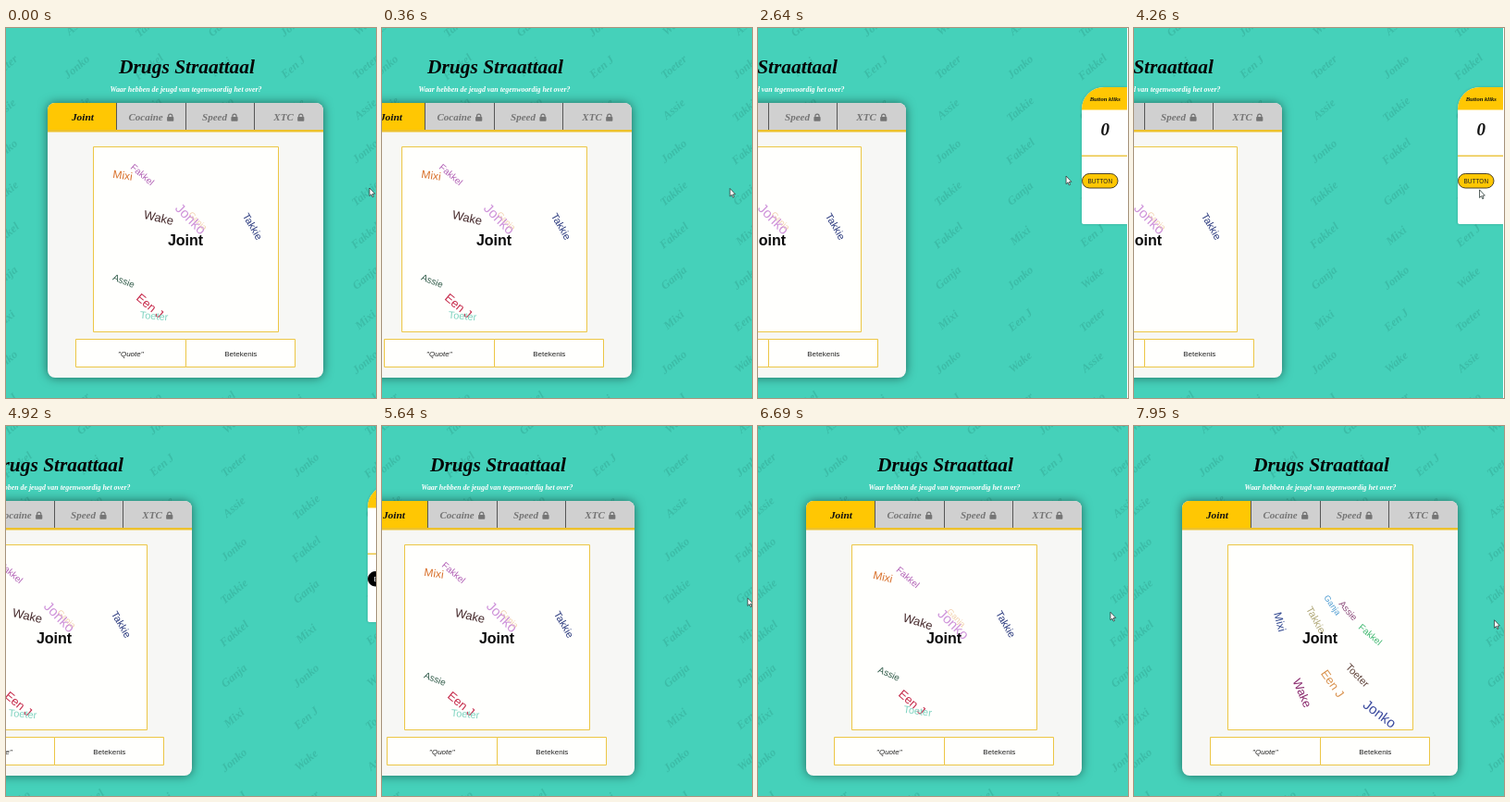
Recreate the animation shown at these times as an HTML page with a canvas. Size 400 by 400 pixels, loop 8 s.

```html
<!DOCTYPE html>
<html lang="nl">
<head>
<meta charset="utf-8">
<title>Drugs Straattaal</title>
<style>
  html, body { margin: 0; width: 100%; height: 100%; overflow: hidden; background: #45d1ba; }
  canvas { display: block; width: 400px; height: 400px; }
</style>
</head>
<body>
<canvas id="stage"></canvas>
<script>
const LOOP = 8000;
const SANS = '"Liberation Sans", Arial, sans-serif';
const SCRIPT = '"Liberation Serif", serif';
const TEAL = '#45d1ba', YELLOW = '#ffc703', LINE = '#ecc645', PAPER = '#fffffd', GRAY = '#757575';
const CARD = { x: 45, y: 81, w: 298, h: 297 };
const SIDE = { x: 533, y: 64, w: 49, h: 148 };

const canvas = document.getElementById('stage');
const ratio = window.devicePixelRatio || 1;
canvas.width = canvas.height = 400 * ratio;
const ctx = canvas.getContext('2d');

const slang = ['Toeter', 'Assie', 'Jonko', 'Takkie', 'Fakkel', 'Ganja', 'Mixi', 'Jonko', 'Een J', 'Wake'];

// Each word moves from one spot to another when the cloud is shuffled
const cloud = [
  { word: 'Mixi',   size: 12, tilt: 8,  from: [126, 160], to: [150, 212], inks: ['#d9722e', '#30478f'] },
  { word: 'Fakkel', size: 10, tilt: 41, from: [147, 159], to: [248, 226], inks: ['#b262b6', '#42b972'] },
  { word: 'Wake',   size: 13, tilt: 13, from: [165, 206], to: [174, 289], inks: ['#462a2c', '#8a2a6e'] },
  { word: 'Ganja',  size: 9,  tilt: 45, from: [207, 209], to: [207, 194], inks: ['#f1cfaa', '#4a9ad0'] },
  { word: 'Jonko',  size: 15, tilt: 45, from: [199, 207], to: [258, 312], inks: ['#cf94da', '#3b4a9e'] },
  { word: 'Takkie', size: 11, tilt: 60, from: [266, 215], to: [189, 210], inks: ['#2b3a7e', '#b0a878'] },
  { word: 'Assie',  size: 10, tilt: 22, from: [127, 274], to: [224, 200], inks: ['#2f5a48', '#8a4a7a'] },
  { word: 'Een J',  size: 13, tilt: 40, from: [155, 301], to: [207, 279], inks: ['#c62b4b', '#d9924e'] },
  { word: 'Toeter', size: 11, tilt: 5,  from: [160, 312], to: [234, 270], inks: ['#7fd3c0', '#5d4037'] }
];

const pointerKeys = [
  [0, 393, 173], [750, 358, 174], [2640, 333, 160], [3180, 368, 199], [3900, 362, 198],
  [4400, 378, 166], [4750, 412, 168], [6400, 381, 201], [7650, 381, 202], [LOOP, 391, 211]
];

const mix = (a, b, k) => a + (b - a) * k;
const span = (t, a, b) => Math.max(0, Math.min(1, (t - a) / (b - a)));
const smooth = k => k * k * (3 - 2 * k);
const pan = t => -183 * span(t, 0, 900) + 190 * span(t, 4510, 6420);

function pointerAt(t) {
  const i = Math.max(1, pointerKeys.findIndex(k => k[0] >= t));
  const [t0, x0, y0] = pointerKeys[i - 1], [t1, x1, y1] = pointerKeys[i];
  const k = span(t, t0, t1);
  return [mix(x0, x1, k), mix(y0, y1, k)];
}

function box(x, y, w, h, r, fill, stroke) {
  ctx.beginPath();
  ctx.roundRect(x, y, w, h, r);
  if (fill) { ctx.fillStyle = fill; ctx.fill(); }
  if (stroke) { ctx.strokeStyle = stroke; ctx.stroke(); }
}

function shaded(blur, alpha, paint) {
  ctx.save();
  ctx.shadowColor = `rgba(0,0,0,${alpha})`;
  ctx.shadowBlur = blur * ratio;
  paint();
  ctx.restore();
}

function label(text, x, y, font, color) {
  ctx.font = font;
  ctx.fillStyle = color;
  ctx.fillText(text, x, y);
}

const script = (text, x, y, size, color) => label(text, x, y, `italic bold ${size}px ${SCRIPT}`, color);

function turned(text, x, y, deg, font, color) {
  ctx.save();
  ctx.translate(x, y);
  ctx.rotate(deg * Math.PI / 180);
  ctx.textBaseline = 'middle';
  label(text, 0, 0, font, color);
  ctx.restore();
}

function pattern() {
  const n = slang.length;
  for (let c = 0; c < 8; c++) {
    for (let r = 0; r < n; r++) {
      const word = slang[(r + 2 * c + n - 1) % n];
      turned(word, c * 78 - 1, r * 45.6 - 3, -40, `italic bold 12.5px ${SCRIPT}`, '#3cbca7');
    }
  }
}

function lock(x) {
  box(x - 3.6, 96, 7.2, 4.8, .8, GRAY);
  ctx.beginPath();
  ctx.arc(x, 95.2, 2.1, Math.PI, 0);
  ctx.lineTo(x + 2.1, 96.5);
  ctx.moveTo(x - 2.1, 95.2);
  ctx.lineTo(x - 2.1, 96.5);
  ctx.lineWidth = 1.2;
  ctx.strokeStyle = GRAY;
  ctx.stroke();
  ctx.lineWidth = 1;
}

function tabs() {
  const w = CARD.w / 4;
  box(CARD.x, CARD.y, CARD.w, 30, [8, 8, 0, 0], '#d0d0d0');
  box(CARD.x, CARD.y, w, 30, [8, 0, 0, 0], YELLOW);
  ['Joint', 'Cocaine', 'Speed', 'XTC'].forEach((name, i) => {
    const left = CARD.x + i * w, mid = left + w / 2;
    if (!i) return script(name, mid + .7, 100, 11.4, '#111');
    box(Math.floor(left), CARD.y, 1, 29, 0, '#565656');
    script(name, mid - 5.7, 100, 11, GRAY);
    lock(mid + 2.3 + ctx.measureText(name).width / 2);
  });
  box(CARD.x, 110, CARD.w, 2.5, 0, '#edc12d');
}

function drawCloud(t) {
  const k = smooth(span(t, 6600, 7140));
  box(94.5, 128.5, 200, 200, 0, PAPER, LINE);
  for (const { word, size, tilt, from, to, inks } of cloud) {
    const endTilt = 75 - .35 * (to[0] - 150);
    turned(word, mix(from[0], to[0], k), mix(from[1], to[1], k), mix(tilt, endTilt, k),
      `${size}px ${SANS}`, inks[k < .5 ? 0 : 1]);
  }
  label('Joint', 194, 234.5, `bold 16px ${SANS}`, '#0b0b0b');
}

function card(t) {
  shaded(11, .5, () => box(CARD.x, CARD.y, CARD.w, CARD.h, 8, '#f7f7f5'));
  tabs();
  drawCloud(t);
  ['"Quote"', 'Betekenis'].forEach((text, i) => {
    const x = 75.5 + i * 119;
    box(x, 336.5, 119 - i, 30, 0, PAPER, LINE);
    label(text, x + 59.3, 354.5, `${i ? '' : 'italic '}8px ${SANS}`, '#222');
  });
}

function counter(t) {
  const { x, y, w, h } = SIDE, mid = x + w / 2 + .8;
  const [fill, edge, ink] = t > 4320 ? ['#000', '#000', '#fff'] : [YELLOW, '#4a4024', '#222'];
  shaded(3, .2, () => box(x, y, w, h, [24, 0, 0, 2], '#fff'));
  box(x, y, w, 24.5, [24, 0, 0, 0], YELLOW);
  script('Button kliks', mid, 78.5, 6.6, '#111');
  script('0', mid, 116, 19, '#111');
  box(x, 137.6, w, 1.3, 0, LINE);
  box(x + .5, 157.5, 38.5, 15.5, 7.8, fill, edge);
  label('BUTTON', x + 19.8, 167.7, `6.5px ${SANS}`, ink);
}

function pointer(x, y) {
  ctx.save();
  ctx.translate(x, y);
  ctx.fill(new Path2D('M0 0V8.6L1.9 6.8 3.2 9.8 4.5 9.2 3.2 6.4 5.8 6.2Z'));
  ctx.fillStyle = '#fff';
  const arrow = new Path2D('M0 0V8.6L1.9 6.8 3.2 9.8 4.5 9.2 3.2 6.4 5.8 6.2Z');
  ctx.fill(arrow);
  ctx.lineWidth = .7;
  ctx.strokeStyle = '#222';
  ctx.stroke(arrow);
  ctx.restore();
}

function draw(t) {
  ctx.setTransform(ratio, 0, 0, ratio, 0, 0);
  ctx.textAlign = 'center';
  ctx.lineWidth = 1;
  ctx.fillStyle = TEAL;
  ctx.fillRect(0, 0, 400, 400);
  ctx.save();
  ctx.translate(Math.round(pan(t)), 0);
  pattern();
  script('Drugs Straattaal', 195.5, 49, 21.4, '#050505');
  script('Waar hebben de jeugd van tegenwoordig het over?', 194.5, 68.8, 7.9, '#fff');
  card(t);
  counter(t);
  box(SIDE.x + SIDE.w, 0, 100, 400, 0, '#fff');
  ctx.restore();
  pointer(...pointerAt(t));
}

const start = performance.now();
function tick() {
  draw((performance.now() - start) % LOOP);
  requestAnimationFrame(tick);
}
tick();
</script>
</body>
</html>
```
